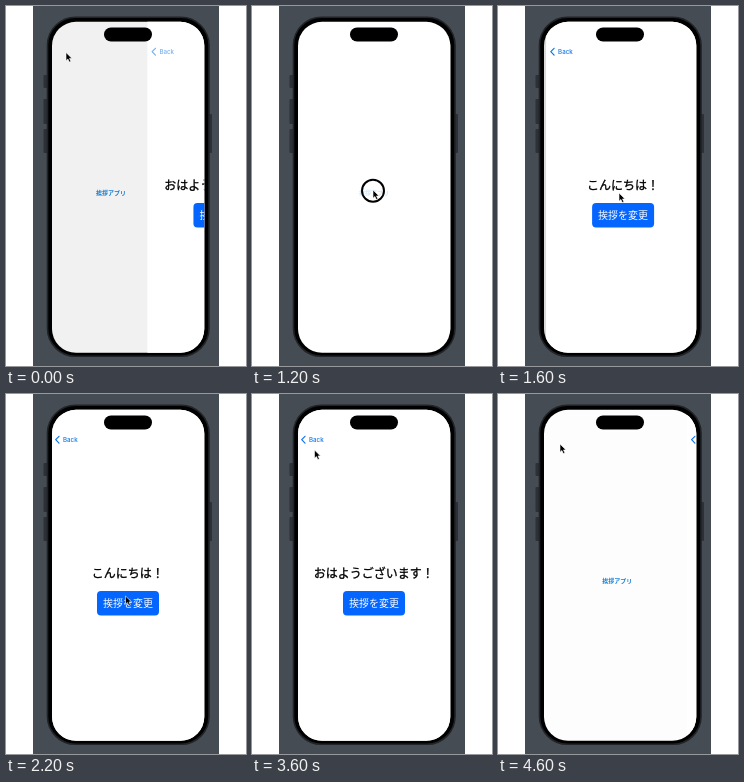
An HTML page for the animation above (4800 ms loop, 240 by 360 pixels).

```html
<!DOCTYPE html>
<html lang="ja">
<head>
<meta charset="utf-8">
<style>
html, body { margin: 0; width: 100%; height: 100%; overflow: hidden; background: #fff; }
svg { display: block; width: 240px; height: 360px; }
text { font-family: "Noto Sans CJK JP", "Noto Sans CJK", sans-serif; text-anchor: middle; }
#back text { font-family: Inter, sans-serif; font-weight: 500; text-anchor: start; }
</style>
</head>
<body>
<svg viewBox="0 0 240 360">
  <clipPath id="screen"><rect x="46" y="15.8" width="152.3" height="331" rx="24"/></clipPath>
  <rect x="27" width="186" height="360" fill="#464c53"/>
  <g fill="#2d3137">
    <rect x="37.5" y="69" width="5" height="13" rx="1"/>
    <rect x="37.5" y="93" width="5" height="25" rx="1"/>
    <rect x="37.5" y="123" width="5" height="24" rx="1"/>
    <rect x="201" y="108" width="5" height="39" rx="1"/>
  </g>
  <rect x="41.5" y="11.3" width="161.5" height="339" rx="28" fill="#000" stroke="#202327" stroke-width="1.6"/>
  <g clip-path="url(#screen)">
    <rect x="45" y="15" width="154" height="332" fill="#fff"/>
    <g id="home">
      <text id="link" x="122" y="189.2" font-size="6" font-weight="700" fill="#1a84dc">挨拶アプリ</text>
    </g>
    <rect id="dim" x="45" y="15" width="154" height="332"/>
    <g id="page">
      <rect x="45" y="15" width="154" height="332" fill="#fff"/>
      <g id="back">
        <path d="M53 42.3L49.7 45.7L53 49.1" fill="none" stroke="#0f76e6" stroke-width="1.2" stroke-linecap="round" stroke-linejoin="round"/>
        <text x="57" y="48" font-size="6.2" fill="#0f76e6">Back</text>
      </g>
      <text id="greeting" x="121.8" y="184.4" font-size="12" stroke="#000" stroke-width=".3"></text>
      <rect id="button" x="91" y="197" width="62" height="24.6" rx="4"/>
      <text id="label" x="122" y="213.2" font-size="10" fill="#fff">挨拶を変更</text>
    </g>
  </g>
  <rect x="98" y="21.5" width="48" height="14" rx="7"/>
  <circle id="ring" cx="121" cy="184.8" r="11" fill="none" stroke="#000" stroke-width="2"/>
  <path id="cursor" d="M0 0V8.2L1.9 6.5L3.3 9.6L4.9 8.9L3.5 5.9H6Z" stroke="#fff" stroke-width=".6"/>
</svg>
<script>
const LOOP = 4800, STEP = 200, WIDTH = 153;
const OPEN = 1200, PUSH = 1347, GREET = 2800, POP = 4403;
const EARLY_POP = -93; // the loop begins in the middle of a pop
const $ = id => document.getElementById(id);
const mix = (a, b, k) => a + (b - a) * k;

// Pointer stops: ms, x, y
const stops = [
  [0, 60, 46.5], [200, 121, 184.5], [1200, 121, 184], [1600, 121, 187], [2000, 121, 208],
  [2200, 119.5, 202], [2600, 119.5, 210], [3200, 119.5, 210], [3400, 79, 69],
  [3600, 62.5, 56], [3800, 62, 50], [LOOP, 62, 50]
];

function pointer(t) {
  const i = stops.findIndex(stop => stop[0] > t);
  const [t0, x0, y0] = stops[i - 1], [t1, x1, y1] = stops[i];
  const k = (t - t0) / (t1 - t0);
  return [mix(x0, x1, k), mix(y0, y1, k)];
}

// Share of a critically damped slide still to go
function remaining(age) {
  const x = .023 * Math.max(0, age);
  return (1 + x) * Math.exp(-x);
}

// A tapped control turns pale, then fades back in
const tapped = age => age < 0 ? 1 : Math.min(1, .2 + .8 * age / STEP);

function draw(now) {
  const t = Math.floor(now % LOOP / STEP) * STEP;
  const popAge = t - (t < PUSH ? EARLY_POP : POP);
  const pushed = t >= PUSH && popAge < 0;
  const covered = WIDTH * (pushed ? 1 - remaining(t - PUSH) : remaining(popAge));
  const press = tapped(t - GREET);

  $('page').setAttribute('transform', `translate(${WIDTH - covered})`);
  $('home').setAttribute('transform', `translate(${-.3 * covered})`);
  $('dim').style.opacity = .15 * covered / WIDTH;
  $('link').style.opacity = tapped(t - OPEN);
  $('back').style.opacity = tapped(popAge);
  $('button').style.fill = press < 1 ? '#bad9fb' : '#0566ff';
  $('label').style.opacity = press;
  $('greeting').textContent = t >= PUSH && t < GREET ? 'こんにちは！' : 'おはようございます！';
  $('ring').style.display = t === OPEN ? '' : 'none';
  $('cursor').setAttribute('transform', `translate(${pointer(t)})`);
}

const start = performance.now();
function tick() {
  draw(performance.now() - start);
  requestAnimationFrame(tick);
}
tick();
</script>
</body>
</html>
```
